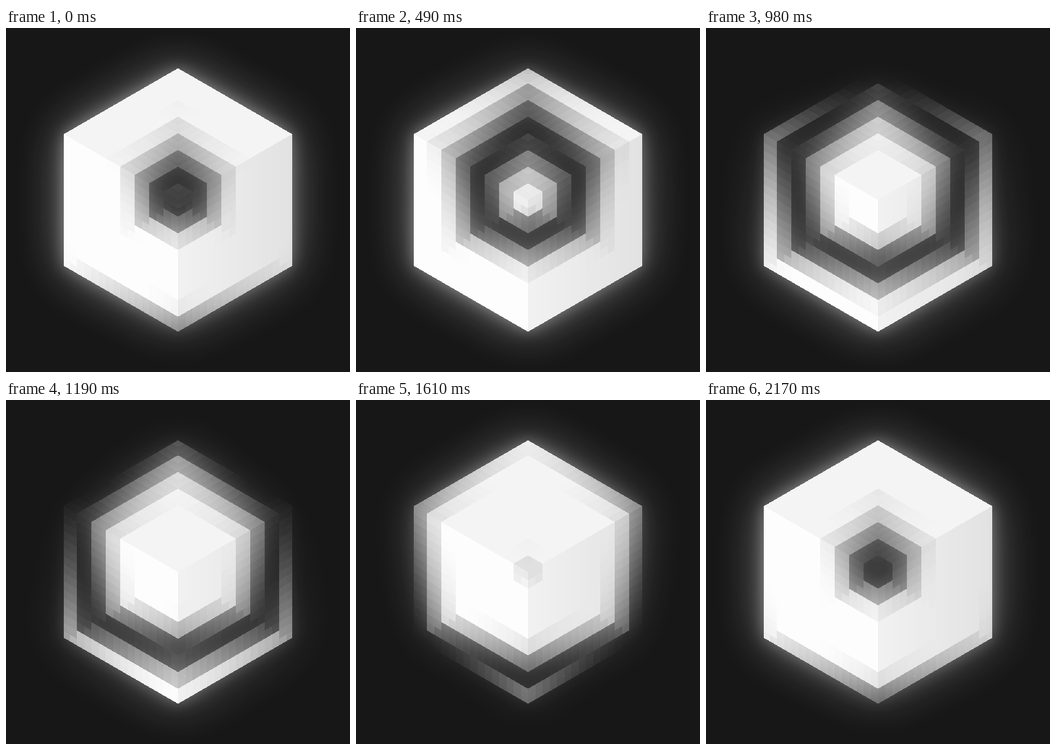
An HTML page that plays this animation: 500x500 px, repeating every 2.31 s.

```html
<!DOCTYPE html>
<html lang="en">
<head>
<meta charset="utf-8">
<title>Pulsing cube</title>
<style>
  html, body { margin: 0; width: 100%; height: 100%; overflow: hidden; background: #171717; }
  svg { display: block; width: 100%; height: 100%; }
</style>
</head>
<body>
<svg viewBox="0 0 500 500">
  <defs>
    <filter id="glow" filterUnits="userSpaceOnUse" x="-100" y="-100" width="700" height="700"
            color-interpolation-filters="sRGB">
      <feGaussianBlur in="SourceGraphic" stdDeviation="34" result="wide"/>
      <feComponentTransfer in="wide" result="halo"><feFuncA type="linear" slope=".46"/></feComponentTransfer>
      <feGaussianBlur in="SourceGraphic" stdDeviation="11" result="tight"/>
      <feComponentTransfer in="tight" result="rim"><feFuncA type="linear" slope=".36"/></feComponentTransfer>
      <feMerge>
        <feMergeNode in="halo"/>
        <feMergeNode in="rim"/>
        <feMergeNode in="SourceGraphic"/>
      </feMerge>
    </filter>
  </defs>
  <rect width="500" height="500" fill="#171717"/>
  <g id="cube" filter="url(#glow)" shape-rendering="crispEdges"></g>
</svg>
<script>
const LOOP = 2310, STEP = 70, CYCLE = 2240;
const LAYERS = 8, SIZE = 7.9, SPLIT = 2;
const CENTER = 250, W = 21, H = 12.12;
const START = 60, PACE = 158, LIT = 1505, RAMP = 365;
const PATH_LAG = 0.25;

const UP_LEFT = [-W, -H], UP_RIGHT = [W, -H], DOWN = [0, 2 * H];

// "path" is the distance along a layer's outline from its top corner.
const topPath = (layer, u, v) => layer - Math.min(u, v);
const sidePath = (layer, u, v) => u >= v ? layer + v : 3 * layer - u;

const faces = [
  { a: UP_LEFT, b: UP_RIGHT, path: topPath, tone: () => 244 },
  { a: UP_LEFT, b: DOWN, path: sidePath, tone: () => 253 },
  { a: UP_RIGHT, b: DOWN, path: sidePath, tone: x => 241 - x * 0.09 }
];

const cube = document.getElementById('cube');
const cells = [];

function addCell({ a, b, path, tone }, i, j) {
  const edge = n => Math.min(n / SPLIT, SIZE);
  const at = (u, v) => [a[0] * u + b[0] * v, a[1] * u + b[1] * v];
  const [u0, u1, v0, v1] = [i, i + 1, j, j + 1].map(edge);
  const u = (i + 0.5) / SPLIT, v = (j + 0.5) / SPLIT;
  const corners = [at(u0, v0), at(u1, v0), at(u1, v1), at(u0, v1)];
  const shade = Math.round(tone(at(u, v)[0]));

  const node = document.createElementNS('http://www.w3.org/2000/svg', 'polygon');
  node.setAttribute('points', corners.map(p => p.map(n => (n + CENTER).toFixed(2)).join()).join(' '));
  node.setAttribute('fill', `rgb(${shade},${shade},${shade})`);
  cube.append(node);

  // The wave moves outward by layer and down along each outline.
  const layer = Math.ceil(Math.max(u, v));
  cells.push({ node, delay: START + PACE * (layer + PATH_LAG * path(layer, u, v)) });
}

for (const face of faces)
  for (let i = 0; i < LAYERS * SPLIT; i++)
    for (let j = 0; j < LAYERS * SPLIT; j++) addCell(face, i, j);

const mod = (n, m) => ((n % m) + m) % m;

function ramp(age) {
  const p = Math.min(1, Math.max(0, (age + RAMP) / (2 * RAMP)));
  return p * p * (3 - 2 * p);
}

function draw(time) {
  const now = Math.min(Math.floor(time / STEP) * STEP, CYCLE - STEP);
  for (const { node, delay } of cells) {
    const age = mod(now - delay + RAMP, CYCLE) - RAMP;
    node.setAttribute('fill-opacity', (ramp(age) - ramp(age - LIT)).toFixed(3));
  }
}

const begin = performance.now();
let shown = -1;
function tick() {
  const time = (performance.now() - begin) % LOOP;
  const step = Math.floor(time / STEP);
  if (step !== shown) draw(time);
  shown = step;
  requestAnimationFrame(tick);
}
tick();
</script>
</body>
</html>
```
